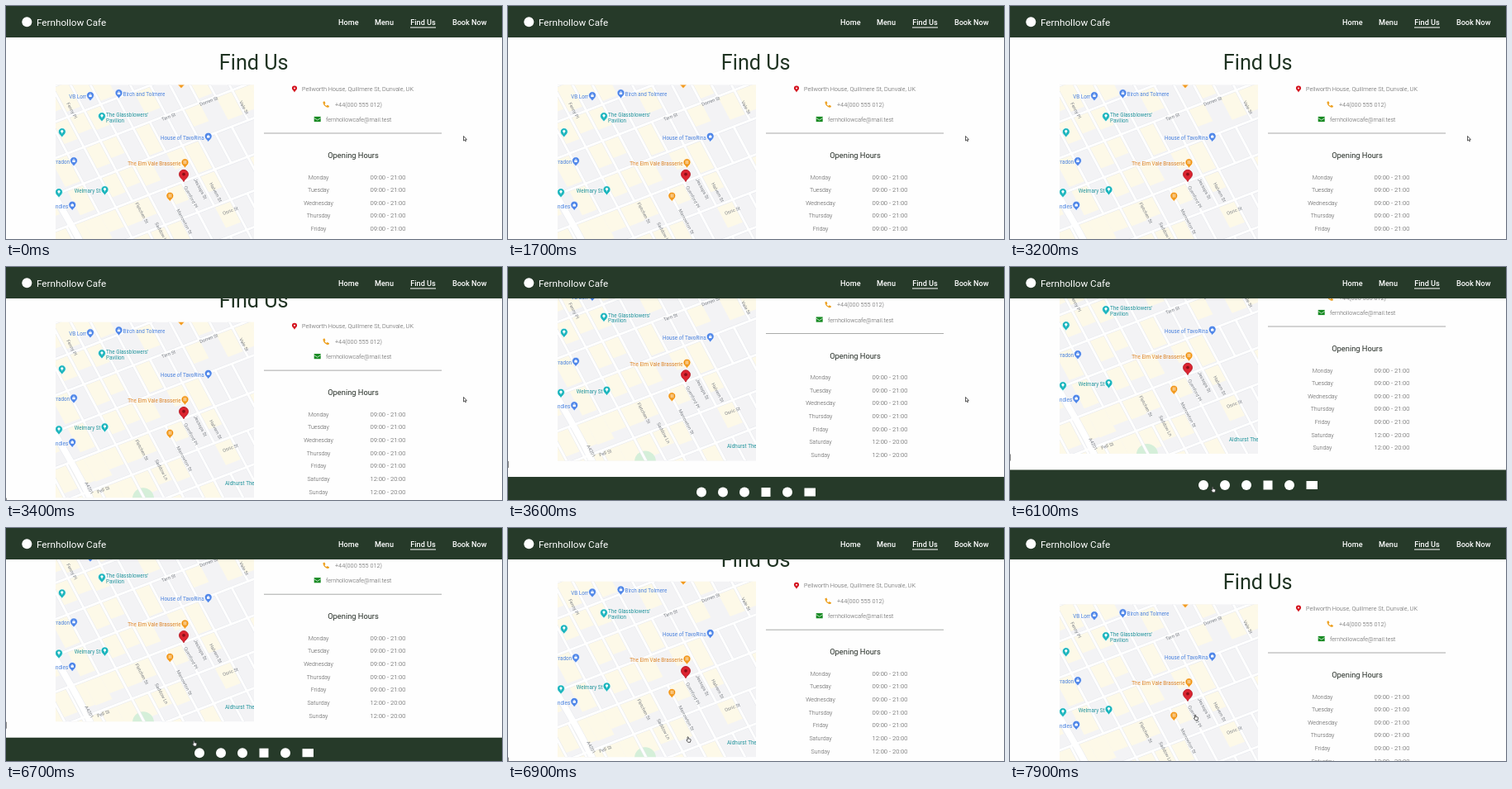
These frames come from a looping animation (600x282 px, 8 s). An HTML page with a canvas:

```html
<!DOCTYPE html>
<html lang="en">
<head>
<meta charset="utf-8">
<title>Find Us</title>
<style>
  html, body { margin: 0; width: 100%; height: 100%; overflow: hidden; background: #fefefe; }
  canvas { display: block; width: 600px; height: 282px; }
</style>
</head>
<body>
<canvas id="stage"></canvas>
<script>
const W = 600, H = 282, LOOP = 8000, STEP = 100;
const GREEN = '#263a29', WHITE = '#fff';
const FONT = 'Roboto, Inter, sans-serif';
const canvas = document.getElementById('stage');
const ctx = canvas.getContext('2d');
const dpr = window.devicePixelRatio || 1;
canvas.width = W * dpr;
canvas.height = H * dpr;

// Eased progress from 0 to 1 between two times.
function glide(t, from, to) {
  const k = Math.min(1, Math.max(0, (t - from) / (to - from)));
  return k * k * (3 - 2 * k);
}

const scrollAt = t => 82 * glide(t, 3200, 3700) - 79 * glide(t, 6600, 7100);

function cursorAt(t) {
  const toHours = glide(t, 3700, 4500), toIcons = glide(t, 4700, 5400);
  const alongIcons = glide(t, 5400, 6000), toMap = glide(t, 6400, 6900), toPin = glide(t, 7300, 7800);
  return [
    553.5 - 59 * toHours - 121 * toIcons - 130 * alongIcons - 27.5 * toMap + 6.5 * toPin,
    157.5 + 44.5 * toHours + 64 * toIcons - 13.5 * toMap - 26.5 * toPin
  ];
}

function text(str, x, y, size, color, { weight = 400, align = 'left', tilt = 0 } = {}) {
  ctx.save();
  ctx.translate(x, y);
  ctx.rotate(tilt * Math.PI / 180);
  ctx.font = `${weight} ${size}px ${FONT}`;
  ctx.textAlign = align;
  ctx.fillStyle = color;
  ctx.fillText(str, 0, 0);
  ctx.restore();
}

function rect(x, y, w, h, color) {
  ctx.fillStyle = color;
  ctx.fillRect(x, y, w, h);
}

function disc(x, y, r, color) {
  ctx.fillStyle = color;
  ctx.beginPath();
  ctx.arc(x, y, r, 0, 7);
  ctx.fill();
}

function shape(path, x, y, fill, stroke, scale = 1) {
  ctx.save();
  ctx.translate(x, y);
  ctx.scale(scale, scale);
  ctx.fillStyle = fill;
  ctx.fill(path);
  if (stroke) {
    ctx.strokeStyle = stroke;
    ctx.lineWidth = 0.8;
    ctx.stroke(path);
  }
  ctx.restore();
}

const pinPath = new Path2D('M0 8C-1 5-5 3.6-5 0A5 5 0 0 1 5 0C5 3.6 1 5 0 8Z');
const phonePath = new Path2D('M-3.8-3L-2-3.8L-.8-1.2L-1.9-.3Q-1.2 1.2.3 1.9L1.2.8L3.8 2L3 3.8C-.6 4-4 .6-3.8-3Z');
const arrowPath = new Path2D('M0 0V5.6L1.3 4.5L2.2 6.3L3 5.9L2.2 4.1H3.8Z');
const handPath = new Path2D('M1.1 0.6Q1.7-.3 2.2.6V2.5L4.6 3Q5.3 3.2 5.1 4.2L4.4 6.8H1.7L-.1 4.4Q0 3.5 1.1 4.1Z');

function mulberry(seed) {
  return () => {
    seed = (seed + 0x6D2B79F5) | 0;
    let v = Math.imul(seed ^ (seed >>> 15), 1 | seed);
    v = (v + Math.imul(v ^ (v >>> 7), 61 | v)) ^ v;
    return ((v ^ (v >>> 14)) >>> 0) / 4294967296;
  };
}

// Corner of the skewed street grid; columns run downhill, rows run uphill.
function corner(col, row) {
  const b = 20 + 24 * col, c = 52 + 44 * row;
  const x = (b + 0.53 * (c - 188.9)) / 1.204;
  return [x, c - 0.385 * (x - 60)];
}

function trace(points) {
  ctx.beginPath();
  points.forEach(p => ctx.lineTo(...p));
}

const COLS = 18, ROWS = 9;
function drawStreets() {
  const random = mulberry(11);
  const lanes = [];
  for (let row = 0; row < ROWS; row++) {
    lanes.push([corner(-4, row), corner(COLS, row)]);
    for (let col = -4; col < COLS; col++) {
      if (random() < 0.72) lanes.push([corner(col, row), corner(col, row + 1)]);
      const yellow = random() < (col < 7 ? 0.72 : 0.4);
      const depth = 0.55 + 0.4 * random();
      if (!yellow) continue;
      trace([corner(col, row), corner(col + 1, row), corner(col + 1, row + depth), corner(col, row + depth)]);
      ctx.fillStyle = '#fdf9e8';
      ctx.fill();
    }
  }
  disc(166, 309, 13, '#d5efd9');
  for (const [width, color] of [[3.8, '#e6e8ed'], [2.8, WHITE]]) {
    ctx.strokeStyle = color;
    ctx.lineWidth = width;
    lanes.forEach(lane => { trace(lane); ctx.stroke(); });
    ctx.lineWidth = width + 5;
    ctx.stroke(new Path2D('M54 222Q80 266 92 289L110 325'));
  }
}

const steepNames = [
  ['Fenny Pl', 73, 118], ['Vale St', 282, 116], ['Quenford Pl', 215, 219], ['Jessops St', 227, 210],
  ['Halvern St', 246, 215], ['Marrowton St', 206, 247], ['Fletchen St', 156, 239],
  ['Saddow Ln', 180, 263], ['A4201', 95, 290]
];
const shallowNames = [['Tarn St', 189, 139], ['Dorren St', 235, 121], ['Osric St', 263, 253], ['Pell St', 111, 303]];

const kinds = {
  shop: { pin: '#4f86e8', label: '#4a82de' },
  sight: { pin: '#1cb5bd', label: '#23959d' },
  food: { pin: '#f29a1f', label: '#dc8428' }
};
// Label lines are split by '|' and sit left or right of the pin.
const places = [
  ['VB Lorr', 102, 109, 'shop', 'left'],
  ['Birch and Tolmere', 136.5, 106, 'shop', 'right'],
  ["The Glassblowers'|Pavilion", 116, 131, 'sight', 'right'],
  ['House of TavoRina', 244.7, 158.5, 'shop', 'left'],
  ['The Elm Vale Brasserie', 216.5, 190, 'food', 'left'],
  ['Verradon', 82, 188, 'shop', 'left'],
  ['Welmary St', 119.5, 223, 'sight', 'left'],
  ['Trandles', 80.2, 241.5, 'shop', 'left'],
  ['', 67.8, 153, 'sight', 'left'],
  ['', 64, 226, 'sight', 'left'],
  ['', 198.3, 230.5, 'food', 'left'],
  ['', 212, 94, 'food', 'left']
];

function drawPlace([label, x, y, kind, side]) {
  const lines = label.split('|'), left = side === 'left';
  lines.forEach((line, i) => text(line, x + (left ? -5 : 5), y + 3 + i * 6.5, 6.3, kinds[kind].label,
    { align: left ? 'right' : 'left' }));
  y += 3 * (lines.length - 1);
  shape(pinPath, x, y - 0.8, kinds[kind].pin, WHITE, 0.9);
  if (kind === 'food') {
    for (const dx of [-1.4, 0.6]) rect(x + dx, y - 3, 0.8, 4.2, WHITE);
  } else if (kind === 'shop') {
    rect(x - 1.7, y - 1.5, 3.4, 2.6, WHITE);
    rect(x - 0.8, y - 2.6, 1.6, 0.7, WHITE);
  } else {
    disc(x, y - 1.4, 1.6, WHITE);
    rect(x - 0.4, y - 0.5, 0.8, 1.9, WHITE);
  }
}

function drawMap() {
  ctx.save();
  ctx.beginPath();
  ctx.rect(60, 95.5, 240, 212.5);
  ctx.clip();
  rect(60, 95, 240, 214, '#f3f3f5');
  drawStreets();
  for (const [name, x, y] of steepNames) text(name, x, y, 5.6, '#7d8187', { tilt: 62 });
  for (const [name, x, y] of shallowNames) text(name, x, y, 5.6, '#7d8187', { tilt: -20 });
  places.forEach(drawPlace);
  text('Aldhurst Theatre', 265, 292.5, 6.3, kinds.sight.label);
  shape(pinPath, 215, 203.8, '#dc2430', '#b3141f', 1.1);
  disc(215, 203.6, 1.9, '#8c0f17');
  ctx.restore();
}

function drawContact() {
  const grey = '#5c5c5c', light = { weight: 300 };
  shape(pinPath, 349, 99.6, '#d4141f', null, 0.62);
  disc(349, 99.6, 1, WHITE);
  text('Pellworth House, Quillmere St, Dunvale, UK', 358, 103.3, 7.25, grey, light);
  shape(phonePath, 387.3, 119, '#eda01f');
  text('+44(000 555 012)', 398, 121.8, 7.3, grey, light);
  rect(372.7, 133.9, 8, 6.2, '#168a22');
  ctx.strokeStyle = WHITE;
  ctx.lineWidth = 0.7;
  ctx.stroke(new Path2D('M372.7 135.5L376.7 138.1L380.7 135.5'));
  text('fernhollowcafe@mail.test', 387, 140, 7.1, grey, light);
  rect(312, 153.5, 215, 1, '#a9aaa9');
}

const days = ['Monday', 'Tuesday', 'Wednesday', 'Thursday', 'Friday', 'Saturday', 'Sunday'];
function drawHours() {
  const light = { weight: 300, align: 'center' };
  text('Opening Hours', 420, 184, 9.3, '#222a23', { align: 'center' });
  days.forEach((day, i) => {
    const y = 209.5 + i * 15.65;
    text(day, 378, y, 7, '#555', light);
    text(i < 5 ? '09:00 - 21:00' : '12:00 - 20:00', 462, y, 7.6, '#505050', light);
  });
}

function drawFooter() {
  rect(0, 327.5, W, 40, GREEN);
  for (let i = 0; i < 5; i++) {
    const x = 234 + i * 26;
    if (i === 3) rect(x - 5.5, 340.5, 11, 11, WHITE);
    else disc(x, 346, 6, WHITE);
  }
  rect(358.5, 341, 13.5, 10, WHITE);
}

function drawHeader() {
  rect(0, 38, W, 2, 'rgba(0,0,0,.05)');
  rect(0, 0, W, 38, GREEN);
  disc(25.3, 19.3, 6, WHITE);
  text('Fernhollow Cafe', 37, 24, 11.7, WHITE);
  [['Home', 414.3], ['Menu', 457.5], ['Find Us', 504.5], ['Book Now', 560.7]].forEach(([label, x]) =>
    text(label, x, 23, 9.1, WHITE, { weight: 500, align: 'center' }));
  rect(489, 25.5, 31, 1, WHITE);
}

function draw(t) {
  ctx.setTransform(dpr, 0, 0, dpr, 0, 0);
  rect(0, 0, W, H, '#fefefe');
  ctx.save();
  ctx.translate(0, -scrollAt(t));
  text('Find Us', 299.7, 77.4, 25.2, '#1f3322', { align: 'center' });
  drawMap();
  drawContact();
  drawHours();
  rect(0, 308.5, 1, 8, '#8a8a8a');
  drawFooter();
  ctx.restore();
  drawHeader();
  shape(t >= 5400 ? handPath : arrowPath, ...cursorAt(t), WHITE, '#333');
}

const start = performance.now();
function tick() {
  const t = (performance.now() - start) % LOOP;
  draw(Math.floor(t / STEP) * STEP);
  requestAnimationFrame(tick);
}
tick();
</script>
</body>
</html>
```
